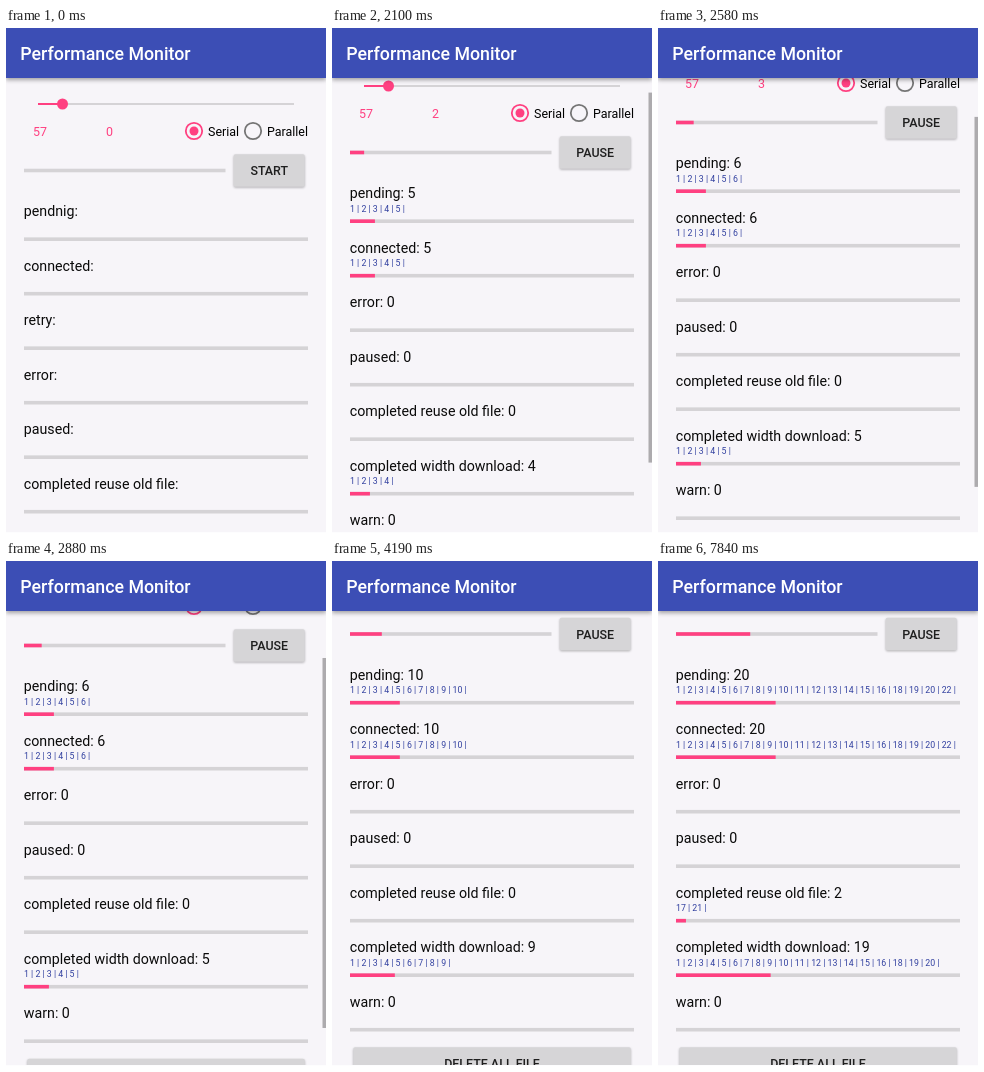
Write an HTML page that moves like this. It is 320 px wide and 505 px high and loops after 8000 ms.

```html
<!DOCTYPE html>
<html lang="en">
<head>
<meta charset="utf-8">
<title>Performance Monitor</title>
<style>
  html, body { margin: 0; width: 100%; height: 100%; overflow: hidden; background: #f7f5f9; }
  svg { display: block; width: 320px; height: 505px; font-family: Roboto, sans-serif; }
  .label { font-size: 14.22px; fill: #0a0a0a; }
  .list { font-size: 8.75px; fill: #303f9f; }
  .small { font-size: 12.44px; }
  .button { font-size: 12.44px; font-weight: 500; fill: #1f1f1f; text-anchor: middle; }
  .pink { fill: #ff4081; }
  .track { fill: #d5d3d6; }
  .ring { fill: none; stroke: #757575; stroke-width: 1.8; }
  .ring.on { stroke: #ff4081; }
  .face { fill: #d6d5d7; filter: drop-shadow(0 1px 1px rgba(0, 0, 0, .28)); }
  #bar { fill: #3c4eb5; filter: drop-shadow(0 2px 2px rgba(0, 0, 0, .35)); }
</style>
</head>
<body>
<svg viewBox="0 0 320 505">
  <rect width="320" height="505" fill="#f7f5f9"/>
  <g id="page">
    <rect class="track" x="32" y="75" width="256" height="2"/>
    <rect class="pink" x="32" y="75" width="24" height="2"/>
    <circle class="pink" cx="56.5" cy="76" r="5.5"/>
    <text class="small pink" x="27" y="107.5">57</text>
    <text class="small pink" x="100" y="107.5" id="seconds">0</text>
    <circle class="ring on" cx="188" cy="103" r="8.2"/>
    <circle class="pink" cx="188" cy="103" r="4.5"/>
    <text class="small" x="202" y="107.5">Serial</text>
    <circle class="ring" cx="247" cy="103" r="8.2"/>
    <text class="small" x="261" y="107.5">Parallel</text>
    <rect class="track" x="18" y="140.7" width="201.5" height="3.6"/>
    <rect class="pink" x="18" y="140.7" height="3.6" id="total"/>
    <rect class="face" x="227.7" y="126.3" width="71" height="32.5" rx="1.8"/>
    <text class="button" x="263.2" y="147.4" id="action">START</text>
    <g id="rows"></g>
    <g id="remove">
      <rect class="face" x="21.3" y="555.8" width="277.5" height="32.5" rx="1.8"/>
      <text class="button" x="160" y="576.6">DELETE ALL FILE</text>
    </g>
  </g>
  <rect id="thumb" x="316.5" width="3.5" height="370" fill="#adabae"/>
  <rect y="504" width="320" height="1" fill="#fdfdfe"/>
  <rect id="bar" width="320" height="50"/>
  <text x="14.3" y="32.2" font-size="17.78" font-weight="500" fill="#fff">Performance Monitor</text>
</svg>
<script>
const LOOP = 8000, TASKS = 57, PITCH = 54.5;
const PRESS = 460, FIRST = 580, CONNECT = 60;
const REUSED = [17, 21];

// When each task finishes; the next one is queued at once and connects a moment later.
const FINISH = [1000, 1260, 1650, 2040, 2460, 3180, 3880, 4000, 4130, 6190, 6310,
  6570, 6770, 6960, 7280, 7280, 7340, 7660, 7660, 7720, 7780];
const SECONDS = [1260, 1720, 2400];
const SCROLL = [[1980, 0], [2040, 10], [2100, 18], [2580, 48], [2880, 58], [3360, 69.5]];

const $ = id => document.getElementById(id);
const passed = (times, t) => times.filter(x => x <= t).length;
const finished = t => passed(FINISH, t);
const started = t => t < FIRST ? 0 : finished(t) + 1;
const upTo = n => Array.from({ length: n }, (_, i) => i + 1);
const isReused = n => REUSED.includes(n);
const fresh = n => upTo(n).filter(i => !isReused(i));

function add(parent, tag, attrs) {
  const el = document.createElementNS("http://www.w3.org/2000/svg", tag);
  for (const name in attrs) el.setAttribute(name, attrs[name]);
  return parent.appendChild(el);
}

function makeRow(name) {
  const g = add($("rows"), "g", {});
  add(g, "rect", { class: "track", x: 18, y: 209.4, width: 284, height: 3.6 });
  return {
    name, g,
    label: add(g, "text", { class: "label", x: 17.8, y: 188.3 }),
    list: add(g, "text", { class: "list", x: 18, y: 201.8 }),
    fill: add(g, "rect", { class: "pink", x: 18, y: 209.4, height: 3.6 })
  };
}

const rows = ["pending", "connected", "retry", "error", "paused", "completed reuse old file",
  "completed width download", "warn"].map(makeRow);

function scrollAt(t) {
  t = Math.floor(t / 60) * 60;
  const i = SCROLL.findIndex(k => k[0] > t);
  if (i === 0) return 0;
  if (i < 0) return SCROLL.at(-1)[1];
  const [t0, a] = SCROLL[i - 1], [t1, b] = SCROLL[i];
  return a + (b - a) * (t - t0) / (t1 - t0);
}

function thumbOpacity(t) {
  if (t < 2040 || t >= 3680) return 0;
  return t < 3560 ? 1 : t < 3620 ? 0.66 : 0.33;
}

function draw(t) {
  const running = t >= PRESS, done = finished(t);
  const items = {
    "pending": fresh(started(t)),
    "connected": fresh(started(t - CONNECT)),
    "completed width download": fresh(done),
    "completed reuse old file": upTo(done).filter(isReused)
  };

  let slot = 0;
  for (const { name, g, label, list, fill } of rows) {
    const hidden = running && name === "retry";
    g.setAttribute("display", hidden ? "none" : "inline");
    if (hidden) continue;
    const ids = items[name] || [];
    g.setAttribute("transform", `translate(0 ${slot++ * PITCH})`);
    label.textContent = running ? `${name}: ${ids.length}` : (name === "pending" ? "pendnig" : name) + ":";
    list.textContent = ids.map(n => n + " |").join(" ");
    fill.setAttribute("width", 284 * ids.length / TASKS);
  }

  const scroll = scrollAt(t);
  $("remove").setAttribute("transform", `translate(0 ${running ? 0 : PITCH})`);
  $("page").setAttribute("transform", `translate(0 ${-scroll})`);
  $("thumb").setAttribute("y", 50 + scroll * 0.81);
  $("thumb").setAttribute("opacity", thumbOpacity(t));
  $("total").setAttribute("width", 201.5 * done / TASKS);
  $("seconds").textContent = passed(SECONDS, t);
  $("action").textContent = running ? "PAUSE" : "START";
}

const start = performance.now();
function tick() {
  draw((performance.now() - start) % LOOP);
  requestAnimationFrame(tick);
}
tick();
</script>
</body>
</html>
```
